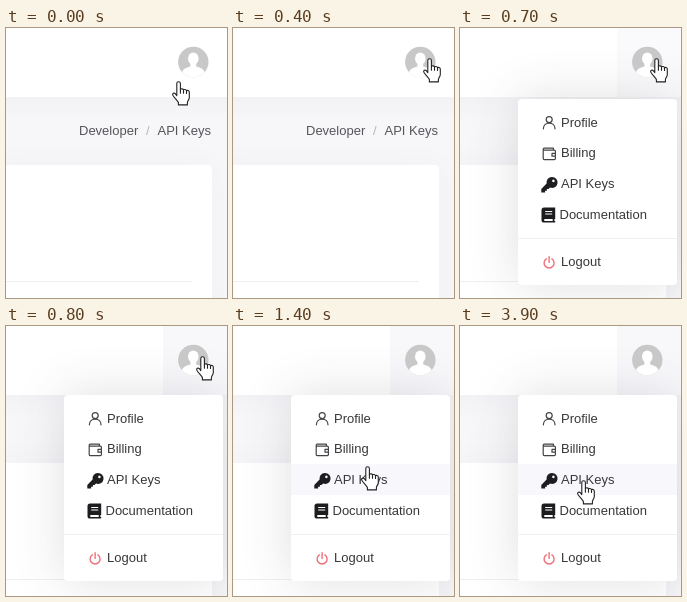
Write an HTML page that moves like this. It is 221 by 270 pixels and loops after 4 s.

```html
<!DOCTYPE html>
<html lang="en">
<head>
<meta charset="utf-8">
<title>User menu</title>
<style>
html, body { margin: 0; width: 100%; height: 100%; overflow: hidden; }
body { position: relative; background: #f7f7f9; }
div, svg { position: absolute; }
svg { left: 0; top: 0; overflow: visible; }
text { font: 13px "Liberation Sans", Arial, sans-serif; fill: #38383b; }

.stage { left: 0; top: 0; width: 221px; height: 270px; overflow: hidden; }
.card { left: -20px; top: 137px; width: 226px; height: 160px; border-radius: 4px; background: #fff; box-shadow: 0 0 30px rgba(82, 63, 105, .04); }
.rule { left: 0; top: 253px; width: 186px; height: 1px; background: #efeff2; }
.header { left: -40px; top: 0; width: 301px; height: 69px; background: #fff; box-shadow: 0 6px 24px rgba(82, 63, 105, .04); }
.user { left: 157px; top: 0; width: 64px; height: 69px; background: #f8f8fb; }
.menu { left: 58px; top: 69px; width: 159px; height: 186px; border-radius: 4px; background: #fff; box-shadow: 0 0 50px rgba(70, 65, 80, .17); }
.hot { left: 0; top: 69px; width: 159px; height: 31px; background: #f8f8fc; }
.sep { left: 0; top: 139px; width: 159px; height: 1px; background: #f0f0f3; }
.crumb text { fill: #55565a; }
.line { fill: none; stroke: #444448; stroke-width: 1.2; stroke-linejoin: round; stroke-linecap: round; }
.solid { fill: #1d1d20; }

.user, .menu, .hot, .hand { animation: 4s step-end infinite; }
.user { animation-name: user; }
.menu { animation-name: menu; }
.hot { animation-name: hot; }
.hand { animation-name: hand; }

@keyframes user {
  0% { opacity: 0; }
  15% { opacity: .2; }
  17.5% { opacity: .7; }
  20%, 100% { opacity: 1; }
}
@keyframes menu {
  0% { visibility: hidden; transform: translateY(8px); }
  15% { visibility: visible; transform: translateY(8px); }
  17.5% { visibility: visible; transform: translateY(2px); }
  20%, 100% { visibility: visible; transform: none; }
}
@keyframes hot {
  0% { opacity: 0; transform: translateY(-61px); }
  30% { opacity: 1; transform: translateY(-61px); }
  32.5% { opacity: 1; transform: translateY(-31px); }
  35%, 100% { opacity: 1; transform: none; }
}
@keyframes hand {
  0% { transform: translate(166px, 53px); }
  2.5% { transform: translate(169px, 50px); }
  5% { transform: translate(181px, 40px); }
  7.5% { transform: translate(192px, 31px); }
  10% { transform: translate(190px, 30px); }
  22.5% { transform: translate(186px, 37px); }
  25% { transform: translate(165px, 64px); }
  27.5% { transform: translate(146px, 85px); }
  30% { transform: translate(143px, 95px); }
  32.5% { transform: translate(136px, 116px); }
  35% { transform: translate(128px, 140px); }
  37.5% { transform: translate(124px, 153px); }
  42.5% { transform: translate(121px, 153px); }
  45% { transform: translate(118px, 153px); }
  97.5%, 100% { transform: translate(117px, 154px); }
}
</style>
</head>
<body>
<div class="stage">
  <div class="card"></div>
  <div class="rule"></div>
  <div class="header"></div>
  <svg class="crumb" width="221" height="270">
    <text x="73" y="107">Developer</text>
    <text x="140" y="107" style="fill:#b4b5ba">/</text>
    <text x="151.5" y="107">API Keys</text>
  </svg>
  <div class="user"></div>

  <div class="menu">
    <div class="hot"></div>
    <div class="sep"></div>
    <!-- drawn in stage coordinates -->
    <svg width="159" height="186">
      <g transform="translate(-58 -69)">
        <g class="line">
          <circle cx="89.2" cy="89.6" r="3"/>
          <path d="M83.4 98.8c0-7.6 11.6-7.6 11.6 0"/>
          <path d="M83.2 120.2h11.2q1 0 1 1v7.4q0 1-1 1H84.2q-1 0-1-1v-9.4q0-1 1-1h9.2v1.8M95.4 123.4h-3.4v2.8h3.4"/>
        </g>
        <g class="solid">
          <path fill-rule="evenodd" d="M91.8 147a5.5 5.5 0 1 1-1.8 10.6l-1.4 1.4h-1.7v1.8h-1.8v1.7h-3.8v-3.6l5.3-5.3A5.5 5.5 0 0 1 91.8 147zM93.4 149.6a1.3 1.3 0 1 0 .01 0z"/>
          <path fill-rule="evenodd" d="M84.1 177.6H95.2v11.4h-.8v1.9h.8v1.6H84.1q-2.6 0-2.6-2.6v-9.7q0-2.6 2.6-2.6zM85.2 181v1h7v-1zM85.2 183.5v1h7v-1zM84.3 189v1.9h8.4V189z"/>
        </g>
        <path d="M86.3 228.8a5 5 0 1 0 5.6 0M89.1 226.6v6" fill="none" stroke="#f0717b" stroke-width="1.4" stroke-linecap="round"/>
        <text x="101" y="97">Profile</text>
        <text x="101" y="127">Billing</text>
        <text x="101" y="158">API Keys</text>
        <text x="99.5" y="189">Documentation</text>
        <text x="101" y="236">Logout</text>
      </g>
    </svg>
  </div>

  <svg width="221" height="270">
    <clipPath id="disc"><circle cx="187.3" cy="34" r="15.2"/></clipPath>
    <g clip-path="url(#disc)">
      <path d="M172 18h31v32h-31z" fill="#c8c8c8"/>
      <g fill="#fff">
        <ellipse cx="187.3" cy="30.6" rx="5.3" ry="6.2"/>
        <path d="M184.4 34h5.8v4.4q7.4 1.4 8.6 6.4V50h-23v-5.2q1.2-5 8.6-6.4z"/>
      </g>
    </g>
    <g class="hand" stroke="#222" stroke-width="1.1" stroke-linejoin="round" stroke-linecap="round">
      <path fill="#fff" d="M4.8 14.6V2.6a1.8 1.8 0 0 1 3.6 0V8.6c.4-1.2 3.1-1 3.1.5.5-1 3-.8 3 .8.5-.9 2.8-.6 2.8 1.2v5.3c0 2.4-1.9 3.4-1.9 5.2v2.3H6.4v-2.3C5.4 19.4 2.4 17 .9 14.2c-.8-1.7 1.2-2.8 2.4-1.5z"/>
      <path fill="none" d="M8.4 8.6v3.6M11.5 9.2v3M14.5 10v2.4"/>
    </g>
  </svg>
</div>
</body>
</html>
```
